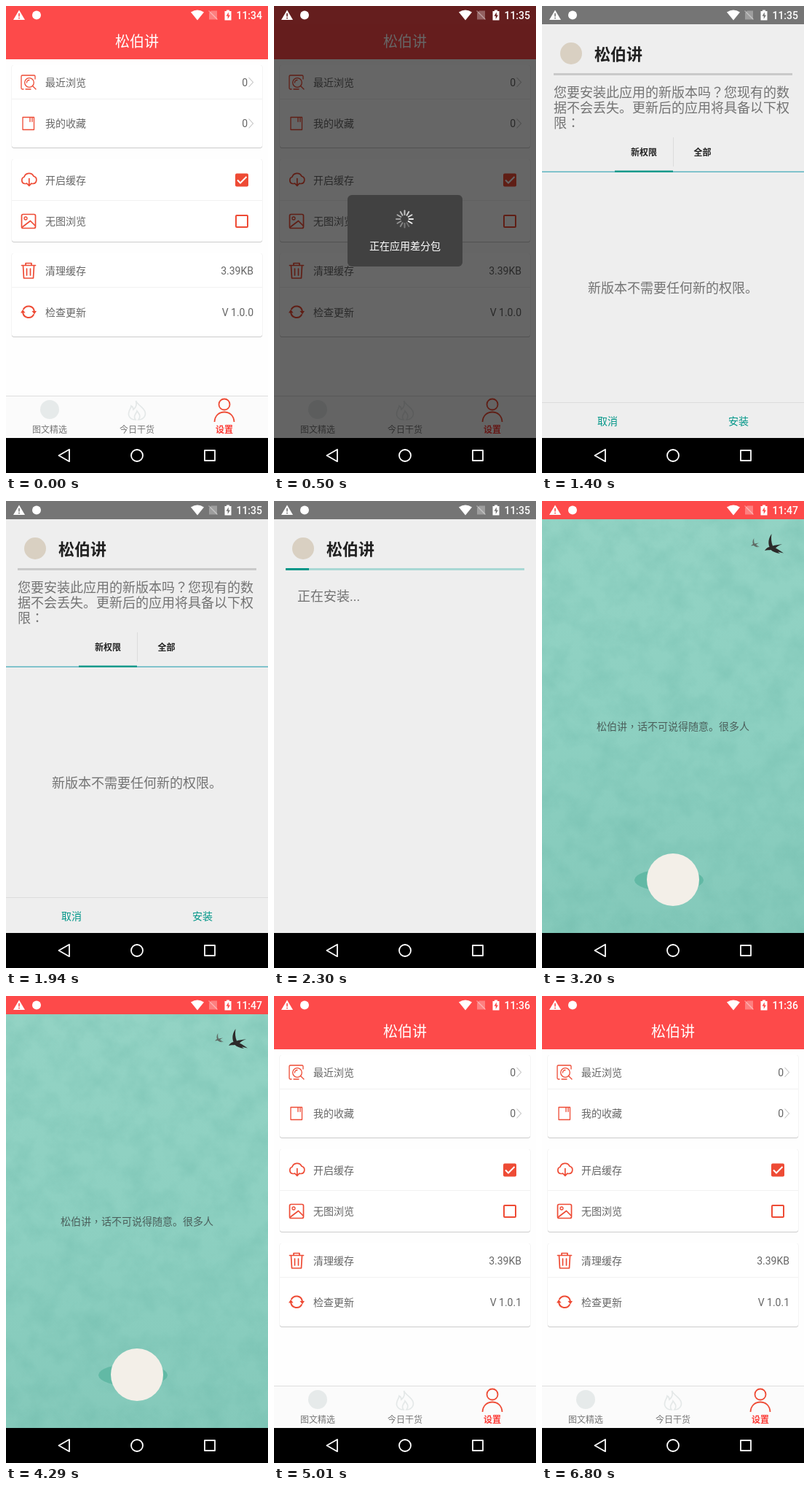
An HTML page for the animation above (8 s loop, 360 by 640 pixels).

```html
<!DOCTYPE html>
<html lang="zh-CN">
<head>
<meta charset="utf-8">
<title>应用更新</title>
<style>
html, body { margin: 0; width: 100%; height: 100%; overflow: hidden; background: #000; }
svg { display: block; width: 100%; height: 100%; }
text { font-family: Roboto, "Noto Sans CJK SC", "Noto Sans CJK", sans-serif; white-space: pre; }
.mid { font-family: "Noto Sans CJK TC", "Noto Sans CJK", sans-serif; }
.line { fill: none; stroke: #ee4b35; stroke-width: 1.7; stroke-linecap: round; stroke-linejoin: round; }
.thin { stroke-width: 1.3; }
</style>
</head>
<body>
<svg id="stage" viewBox="0 0 360 640"></svg>
<script>
const APP = '松伯讲';
const RED = '#fd4a4a', ICON = '#ee4b35', TEAL = '#009688', GREY = '#737373';
const LOOP = 8000;
const scenes = [
  { at: 0, clock: '11:34', bar: RED, show: ['settings'], version: 'V 1.0.0' },
  { at: 500, clock: '11:35', bar: '#651e1e', show: ['settings', 'dialog'], version: 'V 1.0.0' },
  { at: 1400, clock: '11:35', bar: '#757575', show: ['installer', 'confirm'] },
  { at: 2300, clock: '11:35', bar: '#757575', show: ['installer', 'progress'] },
  { at: 3200, clock: '11:47', bar: RED, show: ['splash'] },
  { at: 5010, clock: '11:36', bar: RED, show: ['settings'], version: 'V 1.0.1' }
];

const rect = (x, y, w, h, fill, extra = '') =>
  `<rect x="${x}" y="${y}" width="${w}" height="${h}" fill="${fill}" ${extra}/>`;
const circle = (x, y, r, fill, extra = '') =>
  `<circle cx="${x}" cy="${y}" r="${r}" fill="${fill}" ${extra}/>`;
const path = (d, extra = 'class="line"') => `<path d="${d}" ${extra}/>`;
// Commas, colons and question marks sit in the middle of their cell.
const centred = s => s.replace(/[，：？]/g, '<tspan class="mid" lang="zh-TW">$&</tspan>');
const text = (s, x, y, size, fill, anchor = 'start', extra = '') =>
  `<text x="${x}" y="${y}" font-size="${size}" fill="${fill}" text-anchor="${anchor}" ${extra}>${centred(s)}</text>`;
const group = (id, body) => `<g id="${id}">${body}</g>`;
const THIN = 'class="line thin"';

const icons = {
  browse: path('M24 114H22.500Q21 114 21 112.500V96.500Q21 95 22.500 95H38.500Q40 95 40 96.500V100M27 114H34', THIN) +
    circle(32, 105, 6.3, 'none', THIN) +
    path('M36.700 109.700L41 114M28.500 105A3.500 3.500 0 0 1 32 101.500', THIN),
  book: path('M23 152.500H38.500V169.500H23ZM33 152.500V158.500M36 152.500V158.500', THIN),
  cloud: path('M28 243.500H25.500A4.800 4.800 0 0 1 25 234.300A7 7 0 0 1 38 233.300A5.200 5.200 0 0 1 37 243.500H35.500M31.800 236.500V246M28.500 243L31.800 246.300L35 243'),
  image: rect(21.5, 285.5, 19, 19, 'none', 'rx="2" class="line"') +
    circle(27, 291, 2, 'none', THIN) +
    path('M23 302.500L33.500 294.500L40 301'),
  trash: path('M21.500 355.500H40.500M27 355V352.500H35V355M23.500 356L24.500 373H37.500L38.500 356M28.500 360V369M33.500 360V369'),
  sync: path('M24 415.500A8 8 0 0 1 38.800 418M38 423A8 8 0 0 1 23.200 420.500', 'class="line" style="stroke-width:2"') +
    path('M35.500 418H42L39 422.500ZM26.500 420.500H20L23 416Z', `fill="${ICON}"`)
};

function card(y, h, split) {
  return rect(8, y + 1, 344, h, '#000', 'rx="3" opacity=".17"') +
    rect(7.5, y, 345, h + .5, '#000', 'rx="3" opacity=".08"') +
    rect(8, y, 344, h, '#fff', 'rx="3"') +
    rect(8, split, 344, 1, '#f1f1f1');
}
const row = (icon, label, mid) => icons[icon] + text(label, 54, mid + 5, 14, '#666');
const count = mid => text('0', 332, mid + 5, 14, '#666', 'end') +
  path(`M333.500 ${mid - 6.5}L339.500 ${mid}L333.500 ${mid + 6.5}`, 'fill="none" stroke="#c4c4c4" stroke-width="1.1"');

function settings() {
  return rect(0, 25, 360, 567, '#fefefe') + rect(0, 24, 360, 49, RED) +
    text(APP, 180, 56, 20, '#fff', 'middle') +
    card(81, 113, 127) + row('browse', '最近浏览', 104.5) + count(104.5) +
    row('book', '我的收藏', 161) + count(161) +
    card(210, 113, 266) + row('cloud', '开启缓存', 239) + row('image', '无图浏览', 295) +
    rect(315, 229.5, 18, 18, ICON, 'rx="2"') +
    path('M318 238.500L322 242.500L330.500 234', 'fill="none" stroke="#fff" stroke-width="2"') +
    rect(316, 287, 16, 16, 'none', `rx="1" stroke="${ICON}" stroke-width="2"`) +
    card(339, 114, 385) + row('trash', '清理缓存', 363) + row('sync', '检查更新', 420) +
    text('3.39KB', 340, 368, 14, '#666', 'end') +
    '<text id="version" x="340" y="425" font-size="14" fill="#666" text-anchor="end"></text>' +
    rect(0, 534, 360, 58, '#fbfbfb') + rect(0, 534, 360, 1, '#dedede') +
    circle(60, 553, 13, '#e6eaea') +
    path('M178.500 541C181 547 188 549 191 556C193 562 188 567 182 567C186 562 183 559 180 555C179 559 174 562 178 567C171 567 167 562 169 556C170 552 172 551 172 548C174 549 175 551 175 553C179 550 180 546 178.500 541Z', 'fill="none" stroke="#e4e8e8" stroke-width="1.7"') +
    circle(300, 546, 7.5, 'none', `stroke="${ICON}" stroke-width="1.8"`) +
    path('M286.500 570C287 561 293 556.500 300 556.500S313 561 313.500 570', `fill="none" stroke="${ICON}" stroke-width="1.8"`) +
    text('图文精选', 60, 585, 12, '#777', 'middle') +
    text('今日干货', 180, 585, 12, '#777', 'middle') +
    text('设置', 300, 585, 12, '#fc3a35', 'middle', 'font-weight="700"');
}

function dialog() {
  let spokes = '';
  for (let i = 0; i < 12; i++) {
    spokes += `<line x1="179.500" y1="280.500" x2="179.500" y2="286" stroke="#fff" stroke-width="2" stroke-linecap="round" opacity="${(.95 - ((16 - i) % 12) * .065).toFixed(2)}" transform="rotate(${i * 30} 179.500 292)"/>`;
  }
  return rect(0, 25, 360, 567, '#000', 'opacity=".6"') +
    rect(101, 259, 158, 98, '#414141', 'rx="6"') + spokes +
    text('正在应用差分包', 180, 333.5, 14, '#fff', 'middle');
}

const installer = () => rect(0, 25, 360, 567, '#eee') + circle(40, 65, 15, '#d9d0c2') +
  text(APP, 72, 73.5, 22, '#212121', 'start', 'font-weight="700"');

function confirm() {
  const lines = ['您要安装此应用的新版本吗？您现有的数', '据不会丢失。更新后的应用将具备以下权', '限：'];
  return rect(16, 92, 328, 3, '#c9c9c9') +
    lines.map((s, i) => text(s, 16, 125 + i * 21, 18, GREY)).join('') +
    text('新权限', 140, 204.5, 12, '#222', 'middle', 'font-weight="700"') +
    text('全部', 220.5, 204.5, 12, '#222', 'middle', 'font-weight="700"') +
    rect(180, 180, 1, 40, '#dcdcdc') + rect(0, 226.5, 360, 1.5, '#5fb5c2') +
    rect(100, 225.5, 80, 2.5, '#129a8c') +
    text('新版本不需要任何新的权限。', 63, 393, 18, GREY) +
    rect(0, 543, 360, 1, '#dcdcdc') +
    text('取消', 90, 573.5, 14, TEAL, 'middle', 'font-weight="500"') +
    text('安装', 270, 573.5, 14, TEAL, 'middle', 'font-weight="500"');
}

const progress = () => rect(16, 92, 328, 3, '#a8d8d4') + rect(16, 92, 32, 3, TEAL) +
  text('正在安装...', 32, 137, 18, GREY);

const bird = (x, y, s, fill) => path(
  'M0 23C2 20 4 18.500 6.500 18C4 11 6 5 9.500 0C8.500 6 9 12 11 16.500C14 15.500 19 15 24 14C20 15.500 17 17.500 15 19.500C19 21.500 22 23.500 26 26.500L18 24.500L21 27C15 26 11 24.500 8.500 22C6 22.500 3 22 0 23Z',
  `fill="${fill}" transform="translate(${x} ${y}) scale(${s})"`);

const splash = () => rect(0, 25, 360, 567, 'url(#wall)') +
  rect(0, 25, 360, 567, '#fff', 'filter="url(#grain)"') +
  bird(306, 45, 1, '#2c2a29') + bird(287, 51, .46, '#5f6b65') +
  text(APP + '，话不可说得随意。很多人', 180, 314, 14, '#4b5f5b', 'middle') +
  '<ellipse cx="174.500" cy="519.500" rx="47.500" ry="15.500" fill="#62b9a5"/>' +
  circle(180, 519, 36, '#f3efe8');

function statusBar() {
  const white = 'fill="#fff"';
  return '<rect id="bar" width="360" height="25"/>' +
    path('M18 5.500L26 19H10ZM17.200 10V14.500H18.800V10ZM17.200 15.800V17.400H18.800V15.800Z', white + ' fill-rule="evenodd"') +
    circle(42, 12.5, 6, '#fff') +
    path('M263 19.500L254 8.500Q263 2.500 272 8.500Z', white) +
    path('M282 6.500H290V18.500H279V9.500Z', 'fill="#fff" opacity=".3"') +
    path('M278.500 6.500L290.500 18.500', 'fill="none" stroke="#fff" stroke-width="1.2" opacity=".4"') +
    path('M303 5.500H307V7H309.500V19.500H300.500V7H303ZM305.800 8.500L302.500 13.800H304.700V18L308 12.600H305.800Z', white + ' fill-rule="evenodd"') +
    '<text id="clock" x="352" y="17.500" font-size="14" font-weight="500" fill="#fff" text-anchor="end"></text>';
}

function navBar() {
  const pen = 'fill="none" stroke="#fff" stroke-width="1.8" stroke-linejoin="round"';
  return rect(0, 592, 360, 48, '#000') + path('M72.500 616L87 607.800V624.200Z', pen) +
    circle(180, 616, 8, 'none', pen) + rect(273, 609, 14, 14, 'none', pen);
}

const defs = `<defs>
  <linearGradient id="wall" x1="0" y1="0" x2="0" y2="1">
    <stop offset="0" stop-color="#93d3c4"/><stop offset=".5" stop-color="#8dd0c1"/><stop offset="1" stop-color="#84c9ba"/>
  </linearGradient>
  <filter id="grain" x="0" y="0" width="1" height="1" color-interpolation-filters="sRGB">
    <feTurbulence type="fractalNoise" baseFrequency=".03" numOctaves="6" seed="7"/>
    <feColorMatrix values="0 0 0 0 .36  0 0 0 0 .68  0 0 0 0 .62  .45 0 0 0 -.16"/>
  </filter>
</defs>`;

const layers = { settings, dialog, installer, confirm, progress, splash };
const stage = document.getElementById('stage');
stage.innerHTML = defs +
  Object.entries(layers).map(([id, draw]) => group(id, draw())).join('') + statusBar() + navBar();

const find = id => stage.querySelector('#' + id);
let current = null;

function render(ms) {
  const scene = scenes.filter(s => s.at <= ms).pop();
  if (scene === current) return;
  current = scene;
  for (const id in layers) find(id).style.display = scene.show.includes(id) ? '' : 'none';
  find('bar').setAttribute('fill', scene.bar);
  find('clock').textContent = scene.clock;
  if (scene.version) find('version').textContent = scene.version;
}

const start = performance.now();
function tick() {
  render((performance.now() - start) % LOOP);
  requestAnimationFrame(tick);
}
tick();
</script>
</body>
</html>
```
